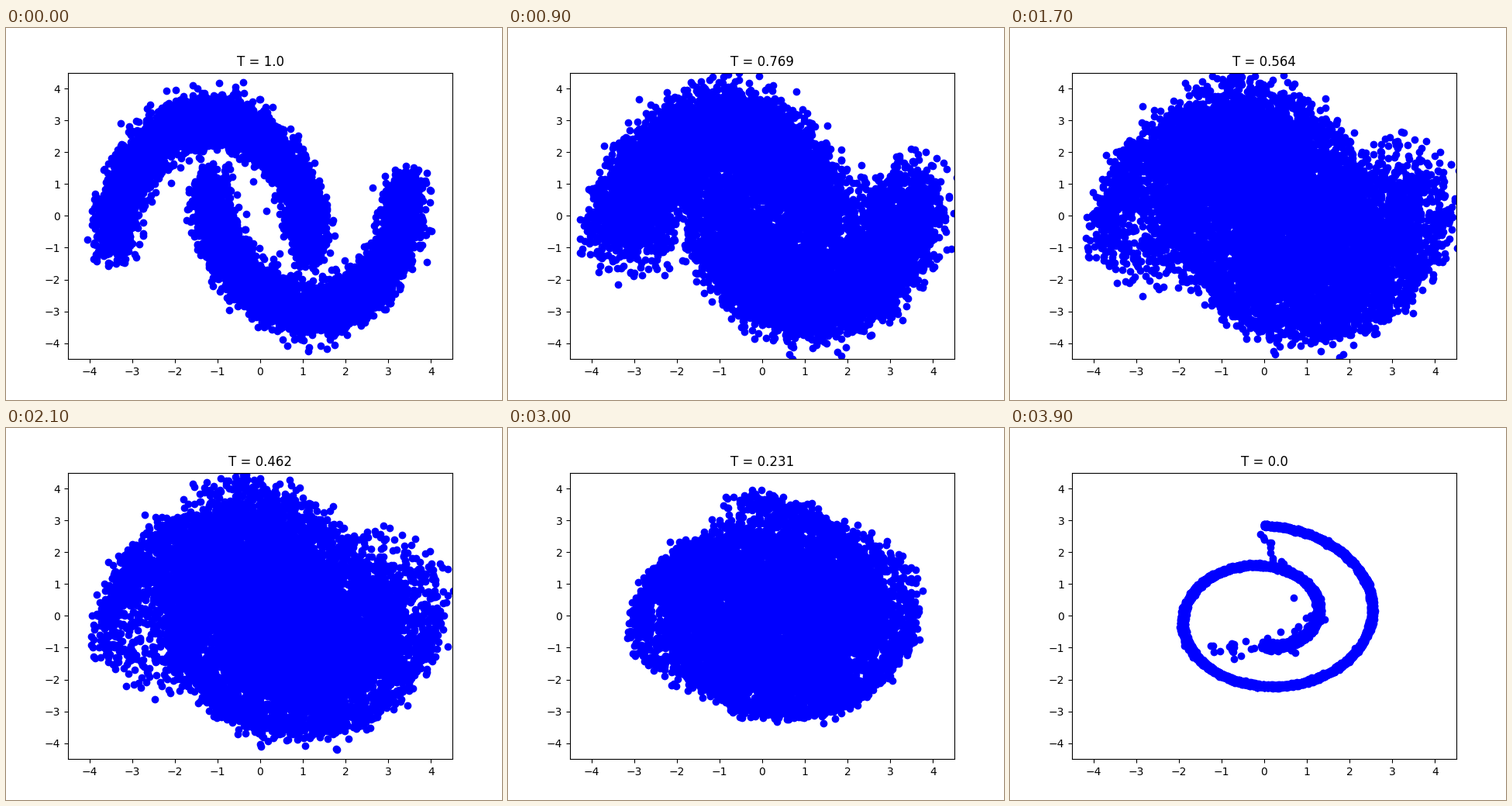
These frames come from a looping animation (640 px wide and 480 px high, 4000 ms). A matplotlib script:

```python
import numpy as np
import matplotlib.pyplot as plt
from matplotlib.animation import FuncAnimation

FRAMES = 40
COUNT = 10000
rng = np.random.default_rng(4)


def make_moons(count):
    """Two interleaved half circles, scaled to a spread of 2 on each axis."""
    angle = rng.uniform(0, np.pi, count)
    upper = np.arange(count) % 2 == 0
    x = np.where(upper, np.cos(angle), 1 - np.cos(angle))
    y = np.where(upper, np.sin(angle), 0.5 - np.sin(angle))
    points = np.column_stack([x, y]) + rng.normal(0, 0.097, (count, 2))
    return 2 * (points - points.mean(axis=0)) / points.std(axis=0)


def make_roll(count):
    """A spiral of one and a half turns, a little rougher at its inner end."""
    t = 1.5 * np.pi * (1 + 2 * rng.random(count))
    spread = 0.024 + 0.03 * np.exp(4.7 - t)
    points = 0.201 * t[:, None] * np.column_stack([np.cos(t), np.sin(t)])
    return points + spread[:, None] * rng.normal(size=(count, 2))


def make_bridge(start, end, count, spread):
    """Stray points scattered along a line between two arms of the spiral."""
    share = rng.random((count, 1))
    points = (1 - share) * np.array(start) + share * np.array(end)
    return points + rng.normal(0, spread, (count, 2))


strays = np.vstack([
    make_bridge((-0.1, 2.75), (0.4, 1.6), 12, 0.1),
    make_bridge((0, -1.05), (-1.2, -1.1), 18, 0.15),
    make_bridge((1.3, 0.2), (0.2, -1.2), 16, 0.3),
])
moons = make_moons(COUNT)
roll = np.vstack([make_roll(COUNT - len(strays)), strays])

fig, ax = plt.subplots(figsize=(6.4, 4.8), dpi=100)
ax.set_xlim(-4.5, 4.5)
ax.set_ylim(-4.5, 4.5)
dots, = ax.plot([], [], "bo")
title = ax.set_title("T = 1.0")


def update(frame):
    progress = frame / (FRAMES - 1)
    turn = progress * np.pi / 2
    points = np.cos(turn) * moons + np.sin(turn) * roll
    dots.set_data(points[:, 0], points[:, 1])
    title.set_text(f"T = {round(1 - progress, 3)}")
    return dots, title


anim = FuncAnimation(fig, update, frames=FRAMES, interval=100,
                     repeat=True, repeat_delay=0, blit=False)
plt.show()
```
